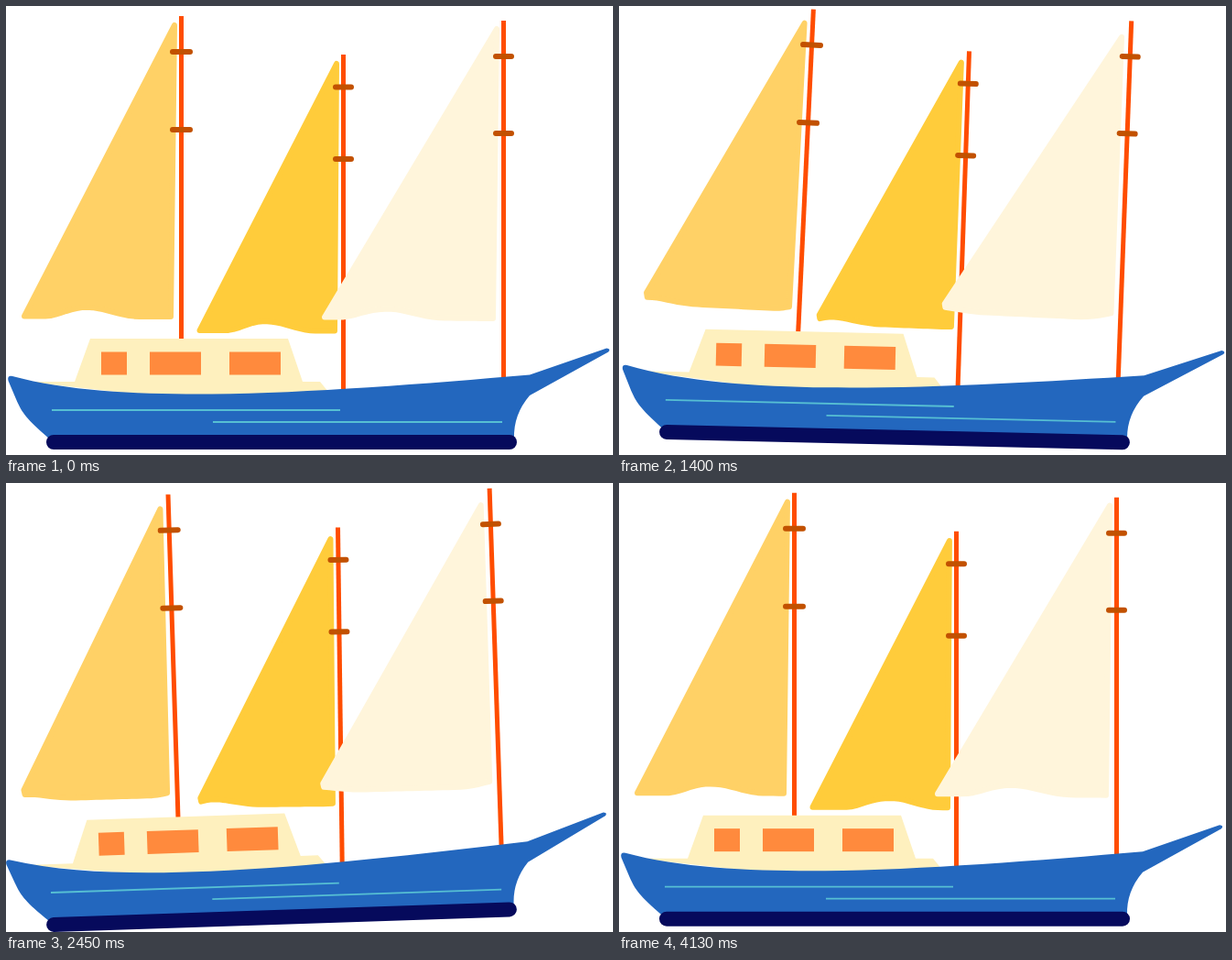
An HTML page with a canvas that plays this animation: 663x490 px, repeating every 4200 ms.

```html
<!DOCTYPE html>
<html lang="en">
<head>
<meta charset="utf-8">
<title>Sailing boat</title>
<style>
html, body { margin: 0; width: 100%; height: 100%; overflow: hidden; background: #fff; }
canvas { display: block; width: 663px; height: 490px; }
</style>
</head>
<body>
<canvas id="stage" width="663" height="490"></canvas>
<script>
const ctx = document.getElementById('stage').getContext('2d');
const LOOP = 4200, STEP = 70, BOB = 2100, FLAP = 1050;
const PIVOT = { x: 301, y: 476 };

// gusts: [start, peak, end, degrees]
const masts = [
  { x: 191.5, top: 11, foot: 430, bars: [50, 135], barHalf: 12.5, delay: 0, color: '#ffd166',
    head: [184, 21], tack: [21, 338.5], clew: [180, 339],
    gusts: [[0, 1050, 1960, 2.1], [2300, 3250, 4130, 2]] },
  { x: 368.5, top: 53, foot: 450, bars: [88.5, 167], barHalf: 11.5, delay: 60, color: '#ffcc3b',
    head: [361, 63], tack: [212.5, 354], clew: [359, 354.5],
    gusts: [[0, 700, 1750, 2.6], [2030, 2750, 4130, 1.85]] },
  { x: 543.5, top: 16, foot: 425, bars: [55, 139], barHalf: 11.5, delay: -60, color: '#fff5db',
    head: [536, 25], tack: [349, 339.5], clew: [532, 341],
    gusts: [[0, 700, 1960, 2], [2450, 3300, 4130, 2.2]] }
];

const rad = d => d * Math.PI / 180;
const mod = (a, n) => ((a % n) + n) % n;
const mix = (a, b, k) => a + (b - a) * k;
const ease = k => (1 - Math.cos(Math.PI * Math.min(1, Math.max(0, k)))) / 2;
const bump = (d, half) => Math.abs(d) < half ? Math.cos(d / half * Math.PI / 2) ** 2 : 0;

function gust(t, [start, peak, end, size]) {
  return size * (t < peak ? ease((t - start) / (peak - start)) : ease((end - t) / (end - peak)));
}

function roll(t) {
  if (t < 933) return 2 * ease(t / 933);
  if (t < 2620) return mix(2, -2, ease((t - 933) / 1687));
  return -2 * ease((3800 - t) / 1180);
}

function lift(t) {
  const k = 1 - Math.abs(mod(t, BOB) / (BOB / 2) - 1);
  return -7.8 * mix(ease(k), k, 0.6);
}

function line(x1, y1, x2, y2, width, color, cap) {
  ctx.lineWidth = width;
  ctx.strokeStyle = color;
  ctx.lineCap = cap || 'butt';
  ctx.beginPath();
  ctx.moveTo(x1, y1);
  ctx.lineTo(x2, y2);
  ctx.stroke();
}

function drawSail(m, t) {
  const p = mod(t - m.delay, FLAP);
  const drop = 14 * bump(p - 570, 390);
  // a ripple travels along the foot from the mast outwards, tighter near the tip
  const span = FLAP / 840;
  const crest = 1 - (p - 560) / 840;
  const ripple = u => {
    const d = mod(u - crest + span / 2, span) - span / 2;
    return bump(d, Math.min(0.37, 0.22 + 0.4 * u));
  };
  const height = u => 10 * Math.min(1, 0.5 + 1.2 * u) * ripple(u);
  const [lx, ly] = m.tack, [rx, ry] = m.clew;
  const tip = ripple(0);
  const x0 = lx + 4 * tip - 1, x1 = rx + 2 * ripple(1);
  ctx.beginPath();
  ctx.moveTo(m.head[0] - drop * 0.28, m.head[1] + drop);
  for (let i = 0; i <= 28; i++) {
    const u = 1 - i / 28;
    ctx.lineTo(mix(x0 + tip, x1, u), mix(ly, ry, u) - height(u));
  }
  ctx.lineTo(x0, ly - 10 * tip);
  ctx.closePath();
  ctx.fillStyle = ctx.strokeStyle = m.color;
  ctx.lineWidth = 6;
  ctx.lineJoin = 'round';
  ctx.fill();
  ctx.stroke();
}

function drawMast(m, t) {
  const lean = Math.max(...m.gusts.map(g => gust(t, g)));
  ctx.save();
  ctx.translate(m.x, m.foot);
  ctx.rotate(rad(lean));
  ctx.translate(-m.x, -m.foot);
  line(m.x, m.top, m.x, m.foot, 5, '#ff4d00');
  drawSail(m, t);
  for (const y of m.bars) {
    line(m.x - m.barHalf + 3, y, m.x + m.barHalf - 3, y, 6, '#c25100', 'round');
  }
  ctx.restore();
}

function drawCabin() {
  ctx.fillStyle = '#fef0be';
  ctx.beginPath();
  ctx.moveTo(22, 410);
  for (const [x, y] of [[75, 410], [92, 363], [308, 363], [324, 410], [343, 410], [352, 421], [200, 430]]) {
    ctx.lineTo(x, y);
  }
  ctx.fill();
  ctx.fillStyle = '#ff8a3d';
  for (const [x, w] of [[104, 28], [157, 56], [244, 56]]) ctx.fillRect(x, 377.5, w, 25);
}

function drawHull() {
  ctx.fillStyle = '#2367be';
  ctx.beginPath();
  ctx.moveTo(7, 404);
  ctx.bezierCurveTo(70, 421, 150, 424, 225, 423.5);
  ctx.bezierCurveTo(330, 422.5, 460, 412, 572, 402.5);
  ctx.lineTo(656, 373.5);
  ctx.quadraticCurveTo(661, 374, 658, 377.5);
  ctx.lineTo(572, 425);
  ctx.quadraticCurveTo(554, 446, 555, 472);
  ctx.lineTo(47, 472);
  ctx.bezierCurveTo(22, 450, 18, 445, 11, 429);
  ctx.lineTo(2.5, 409);
  ctx.quadraticCurveTo(1, 403, 7, 404);
  ctx.fill();
  line(50, 441, 365, 441, 1.8, '#56bfd3');
  line(226, 454, 542, 454, 1.8, '#56bfd3');
  line(52, 476, 550, 476, 16, '#060a5c', 'round');
}

function draw(t) {
  ctx.fillStyle = '#fff';
  ctx.fillRect(0, 0, 663, 490);
  ctx.save();
  ctx.translate(PIVOT.x, PIVOT.y + lift(t));
  ctx.rotate(rad(roll(t)));
  ctx.translate(-PIVOT.x, -PIVOT.y);
  for (const m of masts) drawMast(m, t);
  drawCabin();
  drawHull();
  ctx.restore();
}

const start = performance.now();
function tick() {
  const t = mod(performance.now() - start, LOOP);
  draw(Math.floor(t / STEP) * STEP);
  requestAnimationFrame(tick);
}
tick();
</script>
</body>
</html>
```
